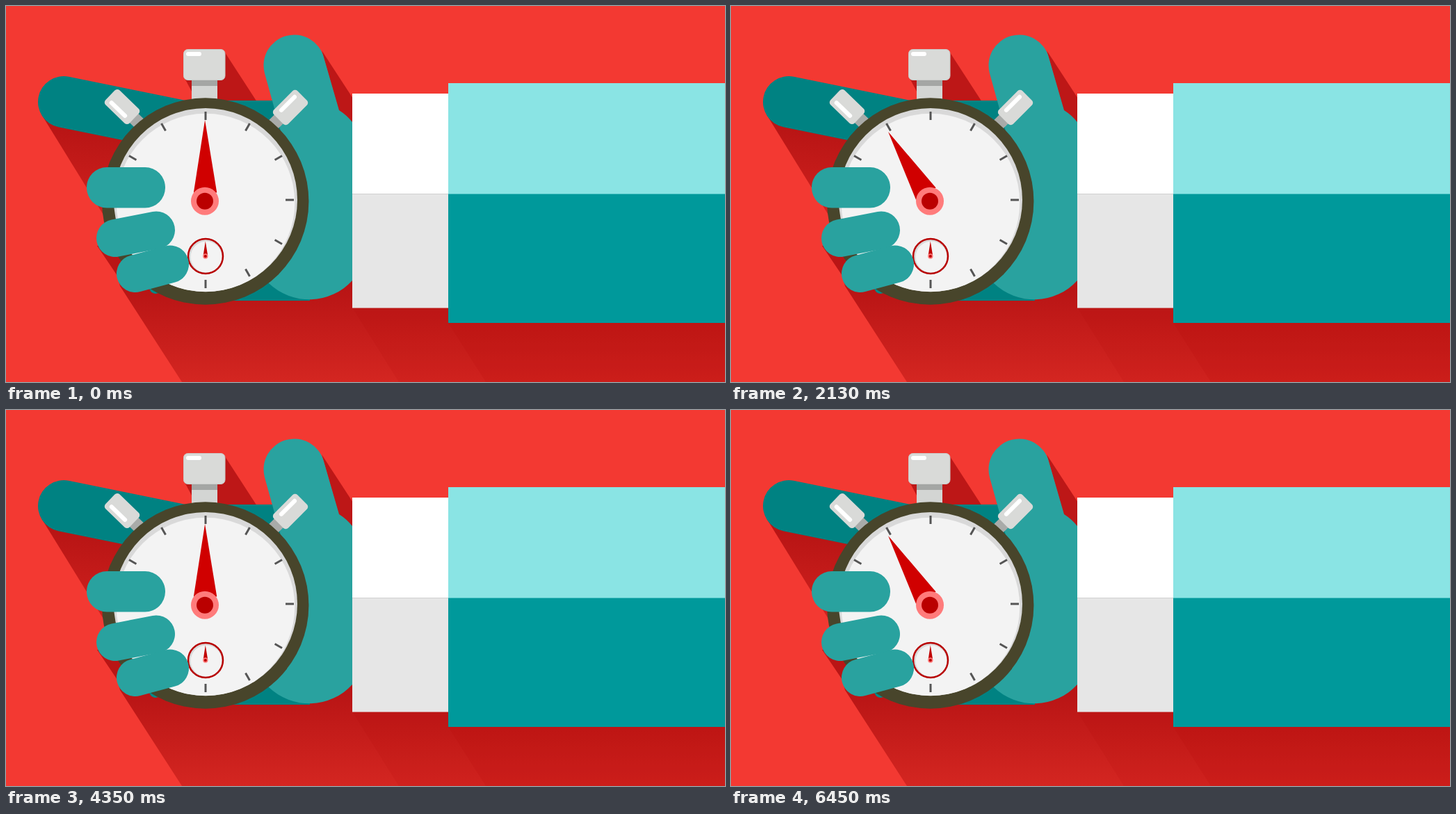
Write an HTML page that moves like this. It is 1034x541 px and loops after 6480 ms.

```html
<!DOCTYPE html>
<html lang="en">
<head>
<meta charset="utf-8">
<title>Stopwatch</title>
<style>
  html, body { margin: 0; width: 100%; height: 100%; overflow: hidden; background: #f33932; }
  svg { display: block; width: 100%; height: 100%; }
  .finger { stroke: #29a29f; stroke-width: 54; stroke-linecap: round; }
</style>
</head>
<body>
<svg viewBox="0 0 1034 541" xmlns="http://www.w3.org/2000/svg">
  <defs>
    <linearGradient id="fingerShade" gradientUnits="userSpaceOnUse" x1="90" y1="170" x2="80" y2="290">
      <stop offset="0" stop-color="#b71414"/>
      <stop offset="1" stop-color="#cf211e"/>
    </linearGradient>
    <linearGradient id="floorShade" gradientUnits="userSpaceOnUse" x1="0" y1="410" x2="0" y2="541">
      <stop offset="0" stop-color="#b91515"/>
      <stop offset="1" stop-color="#d42621"/>
    </linearGradient>
    <g id="knob">
      <rect x="22" y="-9" width="22" height="18" fill="#a9aba9"/>
      <rect x="-24" y="-14.5" width="48" height="29" rx="5" fill="#d9dad8"/>
      <path d="M-15 6.5H12" stroke="#fff" stroke-width="6" stroke-linecap="round"/>
    </g>
  </defs>

  <rect width="1034" height="541" fill="#f33932"/>

  <!-- long shadows -->
  <path d="M51 156L141 302L200 300V150Z" fill="url(#fingerShade)"/>
  <path d="M131 345L160 388L164 403L253 541H1034V430H498V380L200 330Z" fill="url(#floorShade)"/>
  <path d="M498 434L565 541H1034V434Z" fill="#a00" opacity=".1"/>
  <path d="M636 456L690 541H1034V456Z" fill="#a00" opacity=".12"/>
  <path d="M313 64L361 138H275L257 104Z" fill="#bd1717"/>
  <path d="M454 64L499 133V170L479 152Z" fill="#bd1717"/>

  <!-- back of the hand -->
  <path d="M83 138L270 176" stroke="#008282" stroke-width="74" stroke-linecap="round"/>
  <circle cx="215" cy="405" r="9" fill="#008a89"/>
  <rect x="287" y="136" width="150" height="288" fill="#008282"/>
  <path d="M372 97A44 44 0 0 1 457 74L479 150Q490 157 498 167V395A84 84 0 0 1 378 399L300 280L395 180Z" fill="#29a29f"/>

  <!-- cuff and sleeve -->
  <rect x="498" y="126" width="138" height="145" fill="#fff"/>
  <rect x="498" y="270.5" width="138" height="164" fill="#e6e6e6"/>
  <rect x="636" y="111" width="398" height="160" fill="#8ae4e4"/>
  <rect x="636" y="270.5" width="398" height="185.5" fill="#00999b"/>
  <path d="M498 270.5H636" stroke="#d0d0d0"/>

  <!-- buttons -->
  <rect x="267" y="100" width="37" height="36" fill="#d3d5d3"/>
  <rect x="267" y="106" width="37" height="9" fill="#a4a6a4"/>
  <rect x="255.5" y="62.5" width="59.5" height="44" rx="6" fill="#d9dad8" stroke="#cacbc9"/>
  <rect x="259" y="66" width="22" height="6" rx="3" fill="#fff"/>
  <use href="#knob" transform="translate(167 145) rotate(44)"/>
  <use href="#knob" transform="translate(409 146) rotate(135)"/>

  <!-- dial -->
  <circle cx="286.7" cy="281" r="148.7" fill="#48452b"/>
  <circle cx="287" cy="279" r="132" fill="#d9d9d9"/>
  <circle cx="287" cy="283" r="128.3" fill="#f3f3f3"/>
  <g id="ticks" stroke="#555" stroke-width="3"/>

  <circle cx="287" cy="360" r="25" fill="#d9d9d9"/>
  <circle cx="288" cy="361" r="22.5" fill="#f3f3f3"/>
  <circle cx="287" cy="360" r="25" fill="none" stroke="#b80000" stroke-width="2.5"/>
  <path d="M286.8 338.5L290 358H283.8Z" fill="#c00000"/>
  <circle cx="286.8" cy="360" r="3.7" fill="#ff7b7b"/>
  <circle cx="286.8" cy="360" r="2.1" fill="#b80000"/>

  <path id="hand" d="M0 -116.5L16.7 -12H-16.7Z" fill="#d00000"/>
  <circle cx="286" cy="280.7" r="20" fill="#ff7b7b"/>
  <circle cx="286" cy="280.7" r="12" fill="#ba0000"/>

  <!-- gripping fingers -->
  <rect x="116" y="232" width="113" height="58.5" rx="29" fill="#29a29f"/>
  <path class="finger" d="M157 334L216 322.5"/>
  <path class="finger" d="M186 385L236 371.5"/>
</svg>
<script>
  const LOOP = 6480;
  const TICK = 180;
  const hand = document.getElementById('hand');

  document.getElementById('ticks').innerHTML = Array.from({ length: 12 }, (_, hour) =>
    `<path d="M0 -115V-127" transform="translate(287 279) rotate(${hour * 30})"/>`).join('');

  function draw(time) {
    const step = Math.floor((time % LOOP) / TICK);
    const lag = step % 6 ? 1.3 : 0.25; // the hand stops slightly short of its mark
    hand.setAttribute('transform', `translate(286.6 280.5) rotate(${step * 30 - lag})`);
  }

  function loop() {
    draw(performance.now());
    requestAnimationFrame(loop);
  }

  draw(0);
  requestAnimationFrame(loop);
</script>
</body>
</html>
```
